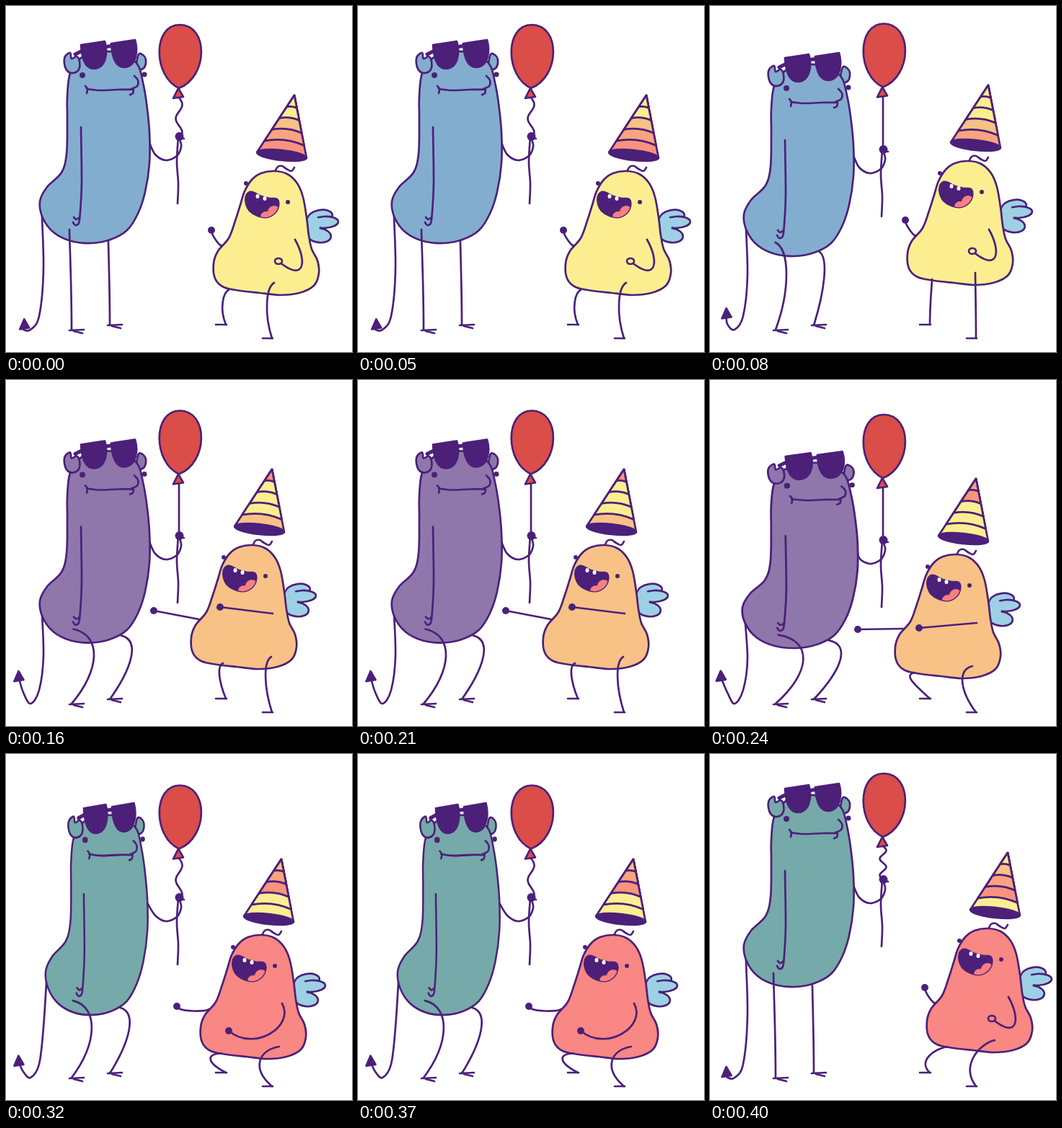
An HTML page with a canvas that plays this animation: 480 px wide and 480 px high, repeating every 480 ms.

```html
<!DOCTYPE html>
<html lang="en">
<head>
<meta charset="utf-8">
<title>Party monsters</title>
<style>
html, body { margin: 0; width: 100%; height: 100%; overflow: hidden; background: #fff; }
canvas { display: block; width: 480px; height: 480px; }
</style>
</head>
<body>
<canvas id="stage" width="480" height="480"></canvas>
<script>
const ctx = document.getElementById('stage').getContext('2d');
const STEP = 80, COUNT = 6, WIDTH = 2.7;
const INK = '#4c2079', RED = '#da4d48', WING = '#9ed0e5', TONGUE = '#f97f80';
const TALL_COLORS = ['#83adcf', '#8f77ac', '#76a9aa'];
const SHORT_COLORS = ['#fcee90', '#f8c185', '#f98783'];
const HAT_RING = ['#fcee90', '#fcee90', '#f8c185', '#f9a47f', '#f9937e', '#fcee90'];

// Key poses, one entry per step
const TALL = [
  [0, 0, 1, 1], [0, 18, 1, 1], [0, 35.5, 1, 1],  // x, y, x scale, y scale
  [-4.4, 53.8, 1.05, .967], [11.4, 19.1, .928, 1.042], [0, -6, 1, 1]
];
const HOLD_Y = [181, 199, 216, 222, 199, 174];
const BALLOON_Y = [0, -1.5, 16.5, 22, 17.5, 1];
const SHORT = [[0, 0], [-14, -14], [-31, 0], [-31, 13], [-18, 22], [13, 13]];
const HIPS = [[310, 372], [308, 368], [301, 368], [284, 364], [298, 379], [329, 395]];
// Hands of the short monster, relative to its body
const REST = { near: [378, 354], far: [285, 311], slack: 1 };
const REACH = {
  2: { near: [328, 315], far: [236, 320], slack: 0 },
  3: { near: [321, 331], far: [236, 333], slack: 0 },
  4: { near: [327, 362], far: [255, 328], slack: 1 }
};

// Smooth path through flat x, y pairs
function curve(p, closed) {
  const n = p.length / 2;
  const at = i => {
    i = closed ? (i + n) % n : Math.max(0, Math.min(n - 1, i));
    return [p[2 * i], p[2 * i + 1]];
  };
  ctx.beginPath();
  ctx.moveTo(p[0], p[1]);
  for (let i = 0; i < n - (closed ? 0 : 1); i++) {
    const [a, b, c, d] = [at(i - 1), at(i), at(i + 1), at(i + 2)];
    ctx.bezierCurveTo(b[0] + (c[0] - a[0]) / 6, b[1] + (c[1] - a[1]) / 6,
      c[0] - (d[0] - b[0]) / 6, c[1] - (d[1] - b[1]) / 6, c[0], c[1]);
  }
  if (closed) ctx.closePath();
}

function paint(fill, outline = true) {
  ctx.fillStyle = fill;
  ctx.fill();
  if (outline) ctx.stroke();
}

function line(...p) { curve(p); ctx.stroke(); }
function blob(fill, ...p) { curve(p, true); paint(fill); }
function shape(fill, path) {
  const p = new Path2D(path);
  ctx.fillStyle = fill;
  ctx.fill(p);
  ctx.stroke(p);
}

function oval(fill, x, y, rx, ry = rx, turn = 0, outline = false) {
  ctx.beginPath();
  ctx.ellipse(x, y, rx, ry, turn, 0, 7);
  paint(fill, outline);
}

function limb(x, y, ...rest) {
  ctx.beginPath();
  ctx.moveTo(x, y);
  ctx.bezierCurveTo(...rest);
  ctx.stroke();
}

// Leg from hip to a planted foot, with the knee pushed sideways by bend
function leg(x, y, footX, footY, bend) {
  const h = footY - y;
  limb(x, y, x + bend, y + .08 * h, footX + bend, y + .55 * h, footX, footY);
}

function clawFoot(x, y) {
  line(x - 2, y, x + 18, y - 1);
  line(x + 4, y + 1, x + 16, y + 4);
}

function drawBalloon(k) {
  const dy = BALLOON_Y[k], hold = HOLD_Y[k], top = 127 + dy, gap = hold - top;
  const slack = Math.max(0, 72 - gap), amp = Math.min(4.5, slack * .3);
  const string = [];
  for (let u = 0; u <= 1; u += 1 / 16)
    string.push(240 + amp * Math.sin(2 * Math.PI * slack / 13 * u), top + gap * u);
  line(...string);
  line(239, hold, 237, hold + 35, 239, hold + 65, 238, hold + 93);
  ctx.save();
  ctx.translate(0, dy);
  shape(RED, 'M239 114L232 128L246 126Z');
  shape(RED, 'M241 26C281 26 281 98 240 114C204 98 203 26 241 26Z');
  ctx.restore();
}

function lens(x, y) {
  ctx.save();
  ctx.translate(x, y);
  shape(INK, 'M0 0L33 -5C38 12 34 32 18 33C5 33 1 18 0 0Z');
  ctx.restore();
}

function drawTallFace() {
  oval(INK, 106, 96, 4);
  oval(INK, 192, 95, 3.5);
  line(110, 111, 113, 115, 112, 121);
  line(112, 115, 130, 117, 155, 116, 175, 116);
  line(178, 97, 183, 103, 182, 111, 174, 115);
  line(177, 116, 176, 121, 172, 123);
  lens(104, 54);
  lens(146, 52);
  ctx.lineWidth = 5;
  line(96, 67, 106, 62);
  line(136, 57, 149, 55);
  ctx.lineWidth = WIDTH;
}

function drawTail(k, x, y) {
  const a = 2 * Math.PI * k / COUNT;
  const tipX = 20 + 5.2 * Math.cos(a), tipY = 427 + 17.6 * Math.cos(a + .5);
  line(x, y, 52, (y + 455) / 2, 46, 430, 34, 449, 24, (tipY + 455) / 2, tipX, tipY);
  shape(INK, `M${tipX} ${tipY - 8}l-6 14l13 -2Z`);
}

function drawTall(k) {
  const color = TALL_COLORS[k >> 1], [tx, ty, sx, sy] = TALL[k], hold = HOLD_Y[k];
  drawTail(k, 49 * sx + tx, 272 * sy + ty);
  line(199 * sx + tx - 1, hold + 6, 207, hold + 25, 222, hold + 33, 237, hold + 27, 243, hold + 14, 241, hold + 4);
  ctx.save();
  ctx.translate(tx, ty);
  ctx.scale(sx, sy);
  blob(color, 184, 67, 192, 70, 194, 79, 190, 87, 181, 87);
  blob(color, 89, 93, 85, 125, 85, 160, 84, 205, 77, 231, 57, 251, 47, 271, 51, 294,
    66, 314, 90, 326, 118, 329, 145, 324, 168, 311, 183, 288, 193, 258, 199, 218,
    199, 175, 195, 135, 190, 106, 183, 82, 165, 68, 135, 63, 104, 72);
  blob(color, 89, 65, 82, 70, 81, 80, 85, 90, 93, 93, 101, 88, 102, 77, 98, 70, 91, 73);
  drawTallFace();
  line(104, 168, 105, 245, 103, 285, 101, 301, 96, 304, 93, 300);
  line(94, 293, 97, 296, 101, 294);
  ctx.restore();

  const hip = 310 * sy + ty, crouch = Math.max(0, hip - 310);
  leg(88 + .15 * crouch, hip, 91, 449, 1.12 * crouch);
  leg(142 + .5 * crouch, 326 + .8 * (hip - 310), 144, 443, .8 * crouch);
  clawFoot(90, 450);
  clawFoot(143, 443);
  oval(INK, 240.5, hold, 6);
  line(241, hold + 2, 247, hold + 3);
}

function drawHat(k) {
  const bands = 5;
  for (let i = bands - 1; i >= 0; i--) {
    const t = (i + 1) / bands, x = 400 - 52 * t, y = 124 + 79 * t;
    shape(HAT_RING[(i - k + COUNT) % COUNT],
      `M400 124L${x} ${y}q${36 * t} ${-7 * t} ${69 * t} ${8 * t}Z`);
  }
  oval(INK, 382.5, 207, 34.5, 7, .115, true);
}

function drawShortFace() {
  oval(INK, 391, 272, 3);
  oval(INK, 333, 246, 3);
  blob(INK, 333, 264, 338, 258, 344, 259, 354, 264, 366, 267, 376, 268, 378, 277,
    373, 287, 362, 293, 349, 291, 338, 284, 333, 274);
  ctx.save();
  ctx.clip();
  oval(TONGUE, 361, 293, 8);
  oval(TONGUE, 372, 286, 9);
  ctx.restore();
  oval('#fff', 349, 264, 2.5, 3);
  oval('#fff', 359, 267, 2.5, 3);
}

function drawWing() {
  oval(WING, 436, 292, 17, 9, -.15, true);
  oval(WING, 434, 318, 17, 10, .15, true);
  oval(WING, 442, 300, 19, 8, -.05, true);
  oval(WING, 426, 305, 9, 16);
}

function drawArms(color, { near, far, slack }) {
  const [nx, ny] = near, [fx, fy] = far;
  limb(299, 332, 299, 332 + 4 * slack, fx, fy + 8 * slack, fx, fy);
  oval(INK, fx, fy, 5);
  limb(401, 324, 401 + 18 * slack, 324 + 32 * slack, nx + 35 * slack, ny + 30 * slack, nx, ny);
  const open = near === REST.near;
  oval(open ? color : INK, nx, ny, 5, open ? 4 : 5, 0, open);
}

function drawShort(k) {
  const color = SHORT_COLORS[k >> 1], [dx, dy] = SHORT[k], [left, right] = HIPS[k];
  ctx.save();
  ctx.translate(dx, dy);
  drawWing();
  blob(color, 372, 229, 354, 232, 341, 241, 331, 257, 325, 276, 318, 298, 309, 322,
    294, 340, 288, 357, 290, 378, 302, 390, 325, 395, 352, 398, 380, 401, 407, 398,
    427, 388, 434, 371, 432, 353, 424, 337, 420, 318, 417, 293, 412, 265, 404, 246, 390, 233);
  drawShortFace();
  line(374, 228, 377, 223, 383, 222, 389, 226, 396, 229, 400, 224);
  drawHat(k);
  drawArms(color, REACH[k] || REST);
  ctx.restore();

  const crouch = dy + 14;
  leg(left, 393 + dy, 305, 442, -.65 * crouch);
  line(291, 442, 306, 442);
  leg(right, 384 + dy, 369, 461, -.8 * crouch);
  line(356, 461, 370, 461);
}

function draw(now) {
  const k = Math.floor(now / STEP) % COUNT;
  ctx.fillStyle = '#fff';
  ctx.fillRect(0, 0, 480, 480);
  ctx.strokeStyle = INK;
  ctx.lineWidth = WIDTH;
  ctx.lineCap = ctx.lineJoin = 'round';
  drawBalloon(k);
  drawTall(k);
  drawShort(k);
}

const start = performance.now();
function tick() {
  draw(performance.now() - start);
  requestAnimationFrame(tick);
}
tick();
</script>
</body>
</html>
```
